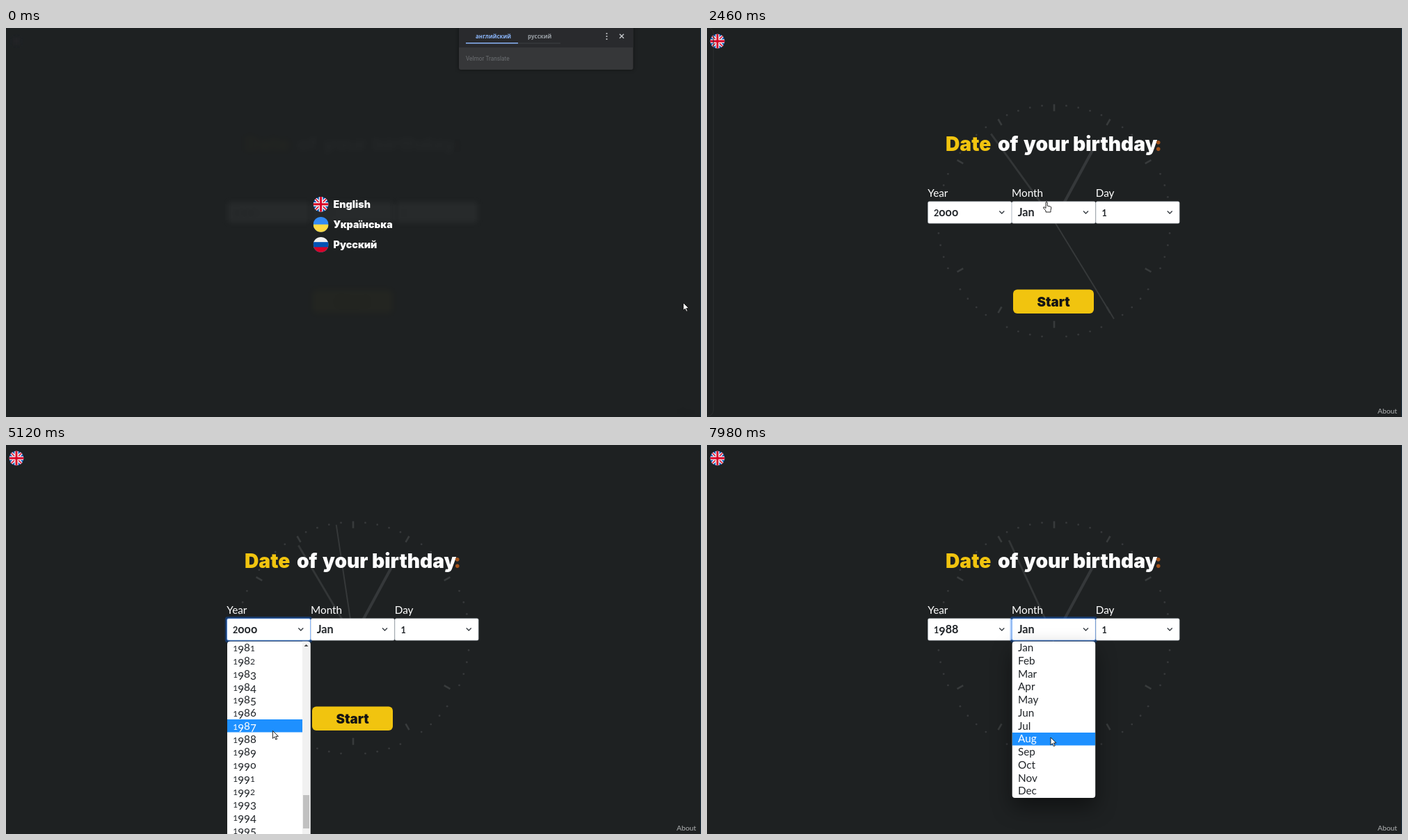
Animation, 999 px wide and 560 px high, one loop 8000 ms. Source, as an HTML page with a canvas:

```html
<!DOCTYPE html>
<html lang="en">
<head>
<meta charset="utf-8">
<style>
html, body { margin: 0; overflow: hidden; background: #1e2122; }
canvas { display: block; }
</style>
</head>
<body>
<canvas id="stage" width="999" height="560"></canvas>
<script>
const c = document.getElementById('stage').getContext('2d');
const BG = '#1e2122', INK = '#212529', GOLD = '#f1c40f', RAD = Math.PI / 180, ROW = 18.75;
const MONTHS = 'Jan Feb Mar Apr May Jun Jul Aug Sep Oct Nov Dec'.split(' ');
const YEARS = Array.from({ length: 31 }, (_, i) => String(1970 + i));
const CLICKS = [1710, 3200, 5340, 6380];
// time, x, y of the pointer
const PATH = [
  [0, 973.5, 395.5], [400, 973.5, 395.5], [1220, 488, 250], [2510, 488, 250], [3100, 408, 267],
  [3400, 408, 267], [4120, 386, 380], [4350, 383, 406], [5000, 383, 406], [5270, 384, 419],
  [5400, 384, 419], [5820, 466, 318], [5880, 466, 318], [6270, 506, 266], [6600, 506, 268],
  [7380, 509, 419], [7450, 509, 419], [7940, 494, 421], [8000, 494, 421]
];

const ease = p => (1 - Math.cos(Math.PI * Math.min(1, Math.max(0, p)))) / 2;

function pointerAt(t) {
  const i = PATH.findIndex(p => p[0] > t);
  const [t0, x0, y0] = PATH[i - 1], [t1, x1, y1] = PATH[i];
  const e = ease((t - t0) / (t1 - t0));
  return { x: x0 + (x1 - x0) * e, y: y0 + (y1 - y0) * e };
}

function text(s, x, y, size, color, weight = 400, family = 'Inter') {
  c.font = `${weight} ${size}px ${family}, sans-serif`;
  c.fillStyle = color;
  c.fillText(s, x, y);
}

// Lato with old-style numerals
function label(s, x, y, color, weight = 400, size = 15.3) {
  if (!/\d/.test(s)) return text(s, x, y, size, color, weight, 'Lato');
  for (const ch of s) {
    const small = '12'.includes(ch), drop = '34579'.includes(ch) ? 3 : 0;
    const glyph = ch === '0' ? 'o' : ch;
    text(glyph, x, y + drop, small ? size * .78 : size, color, weight, 'Lato');
    x += c.measureText(glyph).width;
  }
}

function box(x, y, w, h, r, fill) {
  c.beginPath();
  c.roundRect(x, y, w, h, r);
  c.fillStyle = fill;
  c.fill();
}

function dot(x, y, r, fill) {
  c.beginPath();
  c.arc(x, y, r, 0, 7);
  c.fillStyle = fill;
  c.fill();
}

function line(points, color, width) {
  c.beginPath();
  points.forEach(([x, y]) => c.lineTo(x, y));
  c.strokeStyle = color;
  c.lineWidth = width;
  c.stroke();
}

function ray(cx, cy, deg, from, to, color, width) {
  const sx = Math.sin(deg * RAD), sy = -Math.cos(deg * RAD);
  line([[cx + sx * from, cy + sy * from], [cx + sx * to, cy + sy * to]], color, width);
}

function clock(t) {
  for (let i = 0; i < 60; i++) {
    const a = i * 6;
    if (i % 5) dot(499 + 167 * Math.sin(a * RAD), 278 - 167 * Math.cos(a * RAD), 1.4, '#37393b');
    else ray(499, 270.7, a, 151, 161, '#383b3c', 2.6);
  }
  const s = t / 1000;
  ray(499, 278, 28.4, 0, 116, '#35383a', 4);
  ray(499, 278, -40.8 + 2.01 * s, 0, 155, '#333637', 2.8);
  ray(499, 278, Math.min(148.5 + 76.3 * (s - 2.46), 556), 0, 165, '#36393a', 1.9);
}

function flag(x, y, r, kind) {
  c.save();
  c.beginPath();
  c.arc(x, y, r, 0, 7);
  c.clip();
  c.translate(x, y);
  c.scale(r, r);
  const bands = { uk: ['#0052b4'], ua: ['#338af3', '#ffda44'], ru: ['#f0f0f0', '#0052b4', '#d80027'] }[kind];
  bands.forEach((color, i) => {
    c.fillStyle = color;
    c.fillRect(-1, -1 + 2 * i / bands.length, 2, 2);
  });
  if (kind === 'uk') {
    const cross = (d, color, w) => {
      line([[-1, -d], [1, d]], color, w);
      line([[d, -1], [-d, 1]], color, w);
    };
    cross(1, '#f0f0f0', .42);
    cross(1, '#d80027', .14);
    cross(0, '#f0f0f0', .52);
    cross(0, '#d80027', .27);
  }
  c.restore();
}

function select(x, name, value, focused) {
  label(name, x, 243, '#fff');
  if (focused) box(x - 2.5, 247, 125.5, 37.5, 4, 'rgba(13,110,253,.3)');
  box(x, 249.5, 120.7, 32, 2.5, focused ? '#6ea8fe' : '#ced4da');
  box(x + .8, 250.3, 119.1, 30.4, 2, '#fff');
  label(value, x + 8.7, 271, INK, 700, 16.2);
  line([[x + 103, 263.5], [x + 106.5, 267], [x + 110, 263.5]], '#343a40', 1.3);
}

function page(year, focus) {
  flag(15, 19, 10.5, 'uk');
  text('Date', 343, 176.5, 28.2, GOLD, 900);
  text('of', 418, 176.5, 28.2, '#fff', 900);
  text('your', 455, 176.5, 28.2, '#fff', 900);
  text('birthday', 526, 176.5, 28.2, '#fff', 900);
  text(':', 643.5, 176.5, 28.2, '#a3521b', 900);
  select(317.3, 'Year', year, focus === 'year');
  select(438, 'Month', 'Jan', focus === 'month');
  select(558.7, 'Day', '1', false);
  box(440, 376.5, 116, 34.5, 6, GOLD);
  text('Start', 474.5, 400.5, 18.8, '#141414', 900);
  label('About', 964, 555, '#b4b6b7', 400, 10.3);
}

function dropdown(x, items, first, bottom, pointer, thumb) {
  const w = thumb ? 108 : 119.5;
  c.save();
  c.shadowColor = thumb ? 'transparent' : 'rgba(0,0,0,.45)';
  c.shadowBlur = 30;
  c.shadowOffsetY = 14;
  box(x, 282.7, 119.5, bottom - 282.7, 4, '#fff');
  c.restore();
  c.save();
  c.clip();
  items.forEach((item, i) => {
    const y = first + i * ROW, top = y - ROW / 2;
    const hot = pointer.y > 283 && pointer.y >= top && pointer.y < top + ROW;
    if (hot) {
      c.fillStyle = '#1e90ff';
      c.fillRect(x, Math.round(top), w, 18.5);
    }
    label(item, x + 8.3, y + 5.3, hot ? '#fff' : INK);
  });
  if (thumb) {
    c.fillStyle = '#f1f1f1';
    c.fillRect(x + w, 282, 12, 280);
    c.fillStyle = '#c1c1c1';
    c.fillRect(x + w + 1, thumb, 9, 48);
    c.beginPath();
    [[110.5, 290], [113.5, 287], [116.5, 290]].forEach(([dx, y]) => c.lineTo(x + dx, y));
    c.fillStyle = '#444';
    c.fill();
  }
  c.restore();
}

// Slides out to the left while fading; its edge stays faintly visible
function languagePanel(progress, hover) {
  const shift = -999 * progress;
  c.save();
  c.beginPath();
  c.roundRect(shift, -1, 999, 560, 9);
  c.strokeStyle = '#2b2f30';
  c.lineWidth = 1;
  if (progress) c.stroke();
  c.globalAlpha = 1 - progress;
  c.fillStyle = BG;
  c.fill();
  c.save();
  c.clip();
  c.filter = 'blur(5px)';
  c.globalAlpha *= .022;
  page('2000');
  c.restore();
  c.translate(shift, 0);
  [['uk', 'English'], ['ua', 'Українська'], ['ru', 'Русский']].forEach(([kind, name], i) => {
    flag(452.6, 253.8 + 29 * i, 10.9, kind);
    text(name, 470.5, 258.7 + 29 * i, 14.3, hover && !i ? GOLD : '#fff', 900);
  });
  c.restore();
}

function translatePopup() {
  c.save();
  c.shadowColor = 'rgba(0,0,0,.5)';
  c.shadowBlur = 5;
  box(651, -5, 250.5, 65, 3, '#363739');
  c.restore();
  c.fillStyle = '#292a2d';
  c.fillRect(651, 0, 250.5, 28);
  text('английский', 675, 14.5, 8, '#8ab4f8', 700, 'Open Sans');
  text('русский', 750, 14.5, 8, '#9aa0a6', 700, 'Open Sans');
  line([[736, 22], [797, 22]], '#3c4043', 1);
  line([[661, 21.7], [736, 21.7]], '#8ab4f8', 1.4);
  for (const y of [8, 12, 16]) dot(863.5, y, 1.1, '#c4c7cb');
  line([[882, 8.8], [888, 14.8]], '#c4c7cb', 1.4);
  line([[888, 8.8], [882, 14.8]], '#c4c7cb', 1.4);
  text('Velmor Translate', 661, 47.3, 8.3, '#6c6f72', 400, 'Roboto');
}

function cursor({ x, y }, hand) {
  const shape = hand
    ? 'M-1 1Q0-.8 1.2 1V6L5.5 7Q7 7.3 6.8 9L6 12.5V15H-1V13L-4.5 9Q-4.5 7-2.8 8L-1 9.5Z'
    : 'M0 0V11L2.6 8.6L4.4 12.7L6.2 11.9L4.4 7.9H8Z';
  c.save();
  c.translate(x, y);
  const path = new Path2D(shape);
  c.fillStyle = '#fff';
  c.fill(path);
  c.strokeStyle = '#111';
  c.lineWidth = .9;
  c.stroke(path);
  c.restore();
}

function draw(now) {
  const t = now % 8000, pointer = pointerAt(t);
  c.fillStyle = BG;
  c.fillRect(0, 0, 999, 560);
  clock(t);
  page(t < 5360 ? '2000' : '1988', t < 3200 ? '' : t < 6380 ? 'year' : 'month');

  if (t >= 3220 && t < 5360) {
    const scroll = ease((t - 3600) / 350);
    dropdown(318, YEARS, 295 - 13 * ROW + 34.5 * scroll, 580, pointer, 509 - 5 * scroll);
  }
  if (t >= 6400) dropdown(438.7, MONTHS, 291.8, 508, pointer);

  const overEnglish = t > 1000 && pointer.x < 524;
  if (t < 2490) languagePanel(ease((t - 1710) / 800), overEnglish);
  if (t < 1710) translatePopup();
  c.fillStyle = '#1b3040';
  c.fillRect(998, 0, 1, 560);

  if (CLICKS.some(k => t >= k && t < k + 180)) dot(pointer.x, pointer.y, 8, 'rgba(255,240,70,.78)');
  cursor(pointer, overEnglish && t < 2520);
}

function loop() {
  draw(performance.now());
  requestAnimationFrame(loop);
}
loop();
</script>
</body>
</html>
```
